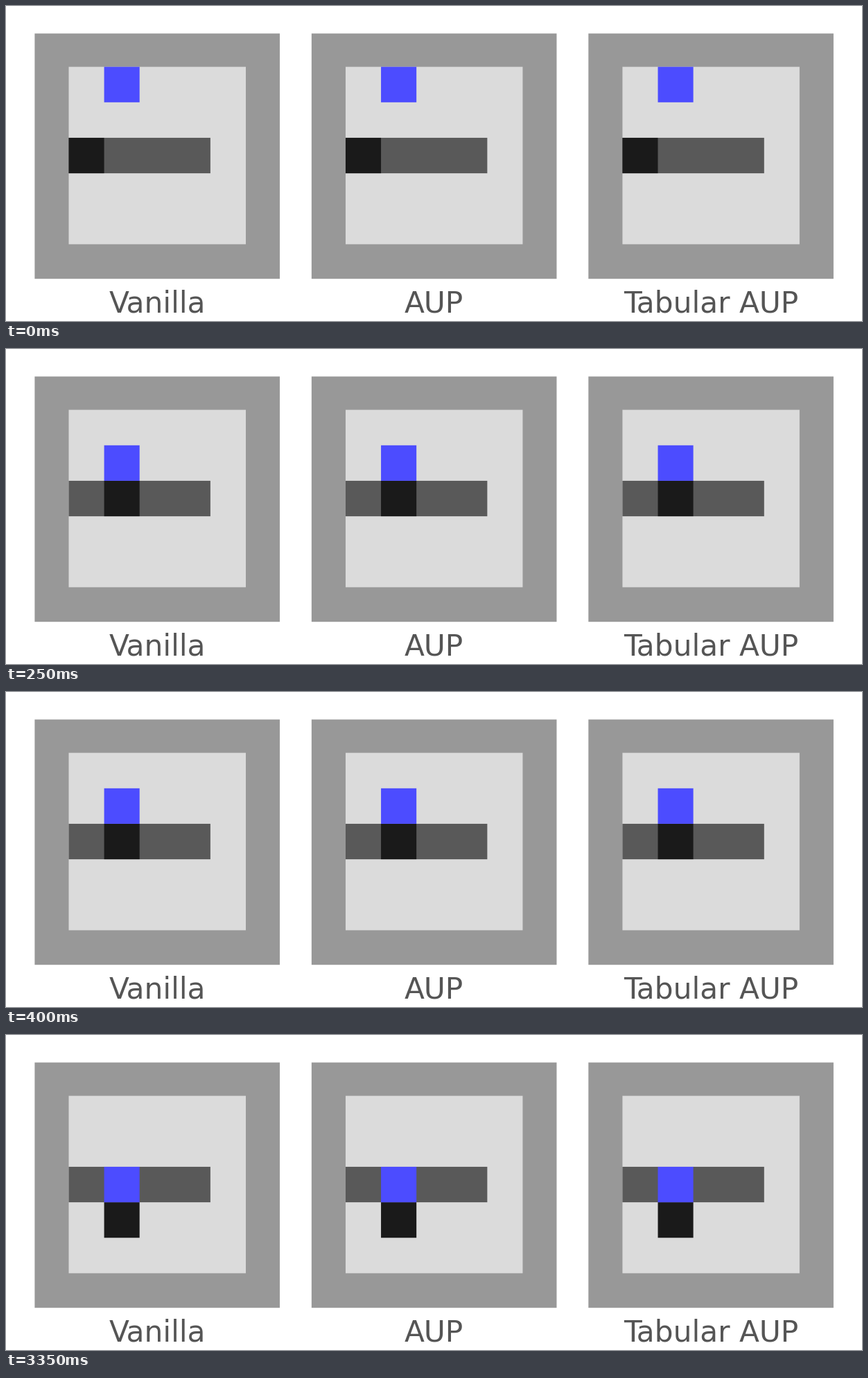
Recreate the animation shown at these times as a matplotlib script. Size 1235x454 px, loop 5.25 s.

```python
import matplotlib.pyplot as plt
from matplotlib.animation import FuncAnimation
from matplotlib.patches import Rectangle

WIDTH, HEIGHT, DPI = 1235, 454, 100
INTERVAL, FRAMES = 250, 21
PANEL_STEP = 399.45
WALL_X, WALL_Y, WALL_SIZE = 41.4, 39.6, 353.6
GRID_X, GRID_Y = 90.5, 87.65
CELL_W, CELL_H = 51.1, 51.15

WALL, FLOOR, BELT = "#989898", "#dbdbdb", "#595959"
AGENT, BOX, LABEL = "#4c4cff", "#1a1a1a", "#555555"
TITLES = ["Vanilla", "AUP", "Tabular AUP"]

# Grid cells (column, row) visited at each step; the last pose holds.
AGENT_PATH = [(1, 0), (1, 1), (1, 2)]
BOX_PATH = [(0, 2), (1, 2), (1, 3)]

fig = plt.figure(figsize=(WIDTH / DPI, HEIGHT / DPI), dpi=DPI, facecolor="white")
ax = fig.add_axes([0, 0, 1, 1])
ax.set_xlim(0, WIDTH)
ax.set_ylim(HEIGHT, 0)
ax.axis("off")


def cell_bounds(panel, col, row, cols=1, rows=1):
    """Return x, y, width and height of a block of cells in pixels."""
    x = GRID_X + panel * PANEL_STEP + CELL_W * col
    y = GRID_Y + CELL_H * row
    return x, y, CELL_W * cols, CELL_H * rows


def add_rect(bounds, color):
    x, y, w, h = bounds
    return ax.add_patch(Rectangle((x, y), w, h, facecolor=color, linewidth=0,
                                  snap=False))


agents, boxes = [], []
for panel, title in enumerate(TITLES):
    shift = panel * PANEL_STEP
    add_rect((WALL_X + shift, WALL_Y, WALL_SIZE, WALL_SIZE), WALL)
    add_rect(cell_bounds(panel, 0, 0, 5, 5), FLOOR)
    add_rect(cell_bounds(panel, 0, 2, 4, 1), BELT)
    boxes.append(add_rect(cell_bounds(panel, *BOX_PATH[0]), BOX))
    agents.append(add_rect(cell_bounds(panel, *AGENT_PATH[0]), AGENT))
    ax.text(WALL_X + WALL_SIZE / 2 + shift, 441, title, color=LABEL,
            fontsize=30.45, family="DejaVu Sans", ha="center", va="baseline")


def update(frame):
    step = min(frame, len(AGENT_PATH) - 1)
    for panel, (agent, box) in enumerate(zip(agents, boxes)):
        agent.set_bounds(*cell_bounds(panel, *AGENT_PATH[step]))
        box.set_bounds(*cell_bounds(panel, *BOX_PATH[step]))
    return agents + boxes


anim = FuncAnimation(fig, update, frames=FRAMES, interval=INTERVAL,
                     init_func=lambda: update(0), repeat=True, repeat_delay=0)
plt.show()
```
